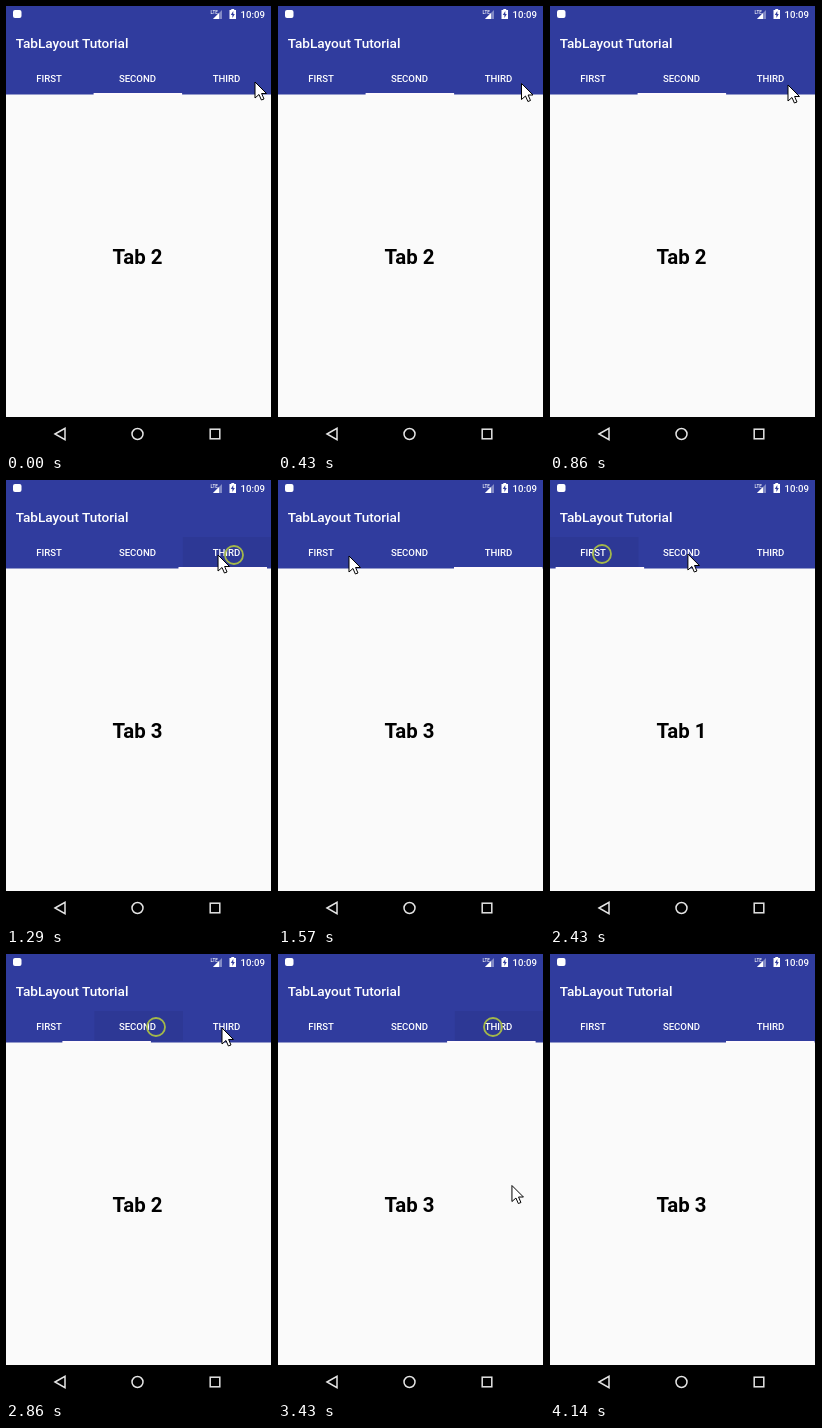
These frames come from a looping animation (266 px wide and 446 px high, 4710 ms). An HTML page:

```html
<!DOCTYPE html>
<html lang="en">
<head>
<meta charset="utf-8">
<title>Tabs</title>
<style>
  html, body { margin: 0; width: 100%; height: 100%; overflow: hidden; background: #fafafa; }
  svg { display: block; width: 266px; height: 446px; }
  text { font-family: Roboto, Arial, sans-serif; font-weight: 500; fill: #fff; }
  .tab { font-size: 9.6px; text-anchor: middle; }
  .page { font-size: 20.4px; font-weight: 700; fill: #000; text-anchor: middle; }
  .nav { fill: none; stroke: #e4e4e4; stroke-width: 1.5; }
</style>
</head>
<body>
<svg viewBox="0 0 266 446">
  <rect width="266" height="446" fill="#fafafa"/>
  <rect width="266" height="88.5" fill="#303c9e"/>
  <rect id="ripple" y="57" width="88.5" height="30" fill="#000" opacity=".06"/>
  <rect id="bar" y="87" width="88.5" height="2" fill="#fffafd"/>

  <!-- status bar -->
  <rect x="7" y="4" width="8.5" height="8" rx="2" fill="#fff"/>
  <text x="204.5" y="7.5" font-size="4.6">LTE</text>
  <path d="M207 13L216 4V13Z" fill="#fff" opacity=".4"/>
  <path d="M207 13L213 7V13Z" fill="#fff"/>
  <path d="M223.5 4H225.3V3H228.2V4H230V13H223.5Z" fill="#fff"/>
  <path d="M227.3 5L224.8 9H226.4V12L228.8 8H227.3Z" fill="#303c9e"/>
  <text x="234.6" y="12" font-size="9.6">10:09</text>

  <text x="9.8" y="41.5" font-size="13.6">TabLayout Tutorial</text>
  <text class="tab" x="43" y="76">FIRST</text>
  <text class="tab" x="131.5" y="76">SECOND</text>
  <text class="tab" x="220.5" y="76">THIRD</text>
  <text class="page" id="page" x="131.5" y="258"></text>

  <!-- navigation bar -->
  <rect y="411" width="266" height="35"/>
  <path class="nav" d="M49 428L59 422.3V433.7Z"/>
  <circle class="nav" cx="131.5" cy="428" r="5.5"/>
  <rect class="nav" x="204.2" y="423.2" width="9.6" height="9.6"/>
  <rect x="265" width="1" height="446"/>

  <circle id="ring" fill="none" stroke="#a3b84a" stroke-width="1.8"/>
  <path id="cursor" d="M0 0V16L4 12.5L6.4 18L9 17L6.6 11.5H11.5Z" fill="#fff" stroke="#000"/>
</svg>
<script>
const LOOP = 4710, FPS = 7, TAB = 88.4, SLIDE = 300;

// time, x, y of the pointer tip
const path = [
  [0, 249, 76], [857, 238, 79], [1000, 229, 75], [1143, 228, 75],
  [1286, 212, 75], [1571, 71, 76], [1857, 54, 74], [2000, 52, 74],
  [2143, 67, 78], [2429, 138, 74], [2714, 150, 73], [2857, 216, 74],
  [3286, 215, 73], [3429, 234, 232], [3571, 240, 231],
  [3857, 240, 231], [4000, 246, 230]
];
const HIDE = 4140;

// ring start, slide start, tabs left and chosen, tap point
const taps = [
  { ring: 1000, slide: 1060, from: 1, to: 2, x: 228, y: 75 },
  { ring: 2142, slide: 2200, from: 2, to: 0, x: 52, y: 74 },
  { ring: 2714, slide: 2732, from: 0, to: 1, x: 150, y: 73 },
  { ring: 3142, slide: 3228, from: 1, to: 2, x: 215, y: 73 }
];

const $ = id => document.getElementById(id);
const set = (id, attrs) => {
  for (const k in attrs) $(id).setAttribute(k, attrs[k]);
};
const show = (id, on) => set(id, { visibility: on ? "visible" : "hidden" });

// cubic-bezier(.4, 0, .2, 1)
function ease(x) {
  if (x <= 0) return 0;
  if (x >= 1) return 1;
  let lo = 0, hi = 1;
  for (let i = 0; i < 20; i++) {
    const s = (lo + hi) / 2, q = 1 - s;
    if (1.2 * q * q * s + 0.6 * q * s * s + s ** 3 < x) lo = s;
    else hi = s;
  }
  return lo * lo * (3 - 2 * lo);
}

function pointAt(t) {
  const i = path.findIndex(p => p[0] > t);
  if (i < 0) return path[path.length - 1].slice(1);
  const a = path[i - 1], b = path[i], k = (t - a[0]) / (b[0] - a[0]);
  return [1, 2].map(n => a[n] + (b[n] - a[n]) * k);
}

function draw(ms) {
  const t = Math.floor((ms + 3) * FPS / 1000) * 1000 / FPS;

  const [x, y] = pointAt(t);
  set("cursor", { transform: `translate(${x} ${y})` });
  show("cursor", t < HIDE);

  let tab = 1, pos = 1;
  for (const p of taps) {
    if (t < p.slide) break;
    tab = p.to;
    pos = p.from + (p.to - p.from) * ease((t - p.slide) / SLIDE);
  }
  set("bar", { x: pos * TAB - 0.8 });
  $("page").textContent = "Tab " + (tab + 1);

  const tap = taps.find(p => t >= p.ring && t < p.ring + 400);
  show("ring", tap);
  show("ripple", tap && t >= tap.slide);
  if (tap) {
    const r = Math.min(9, 3.5 + (t - tap.ring) * 0.04);
    set("ring", { cx: tap.x, cy: tap.y, r });
    set("ripple", { x: tap.to * TAB });
  }
}

const start = performance.now();
(function tick() {
  draw((performance.now() - start) % LOOP);
  requestAnimationFrame(tick);
})();
</script>
</body>
</html>
```
